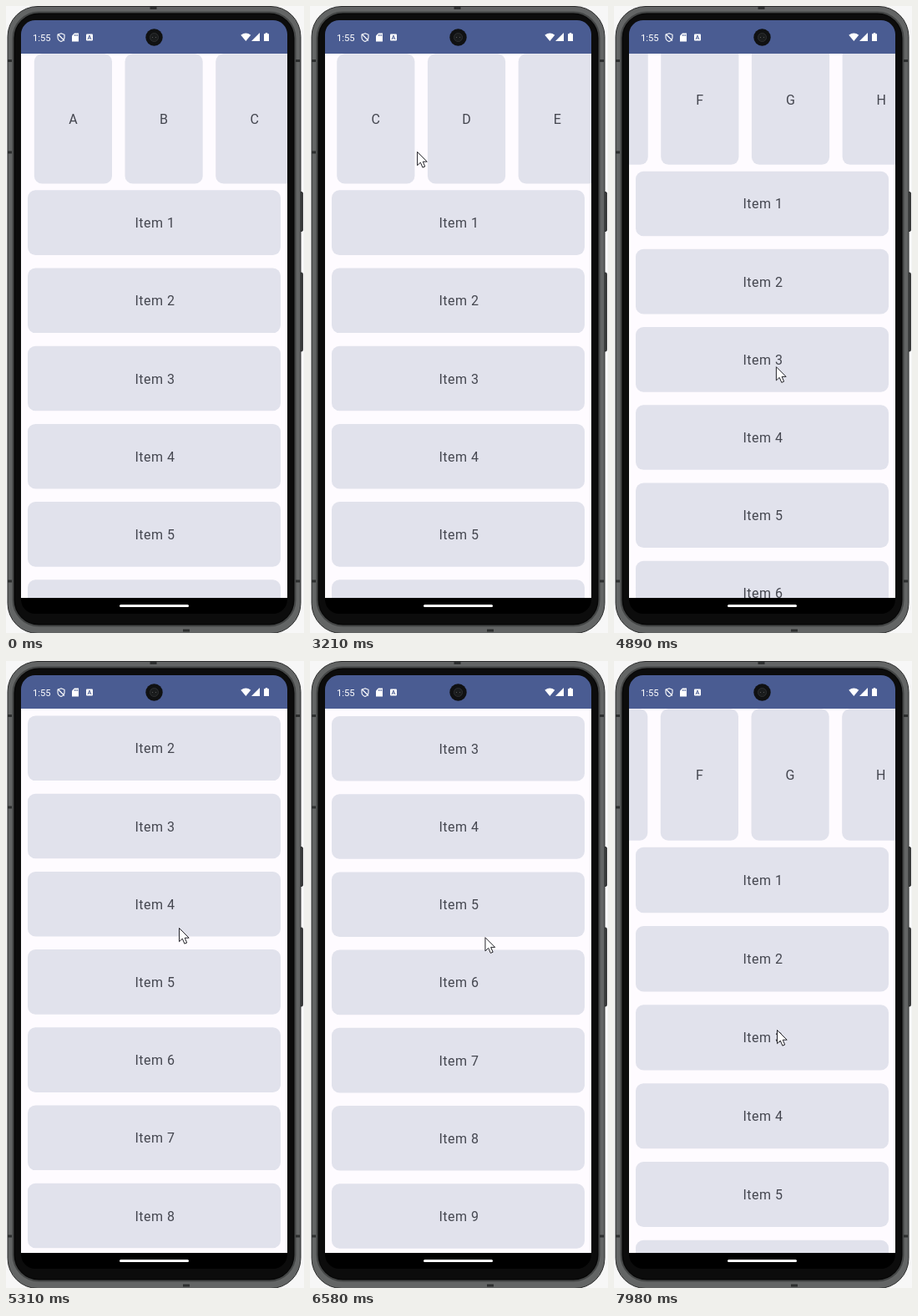
An HTML page for the animation above (8 s loop, 357 px wide and 750 px high).

```html
<!DOCTYPE html>
<html lang="en">
<head>
<meta charset="utf-8">
<title>Nested scrolling list</title>
<style>
html, body { margin: 0; width: 100%; height: 100%; overflow: hidden; background: #f7f7f7; }
svg { display: block; width: 100vw; height: 100vh; }
text { font-family: Roboto, sans-serif; }
#list rect { fill: #e1e2ec; }
#list text { font-size: 16px; letter-spacing: .5px; fill: #44464f; text-anchor: middle; }
</style>
</head>
<body>
<svg viewBox="0 0 357 750">
  <defs>
    <clipPath id="view"><rect x="18" y="57" width="319" height="651"/></clipPath>
    <clipPath id="glass"><rect x="18" y="17" width="319" height="710" rx="17"/></clipPath>
  </defs>

  <!-- phone body -->
  <g fill="#3c3e3e" stroke="#1c1d1d" stroke-width=".8">
    <rect x="350" y="222.5" width="5.5" height="47" rx="1.5"/>
    <rect x="350" y="319" width="5.5" height="94" rx="1.5"/>
  </g>
  <rect x="2" y=".5" width="351" height="750" rx="36" fill="#636565" stroke="#2b2c2c"/>
  <rect x="8.500" y="7.500" width="338" height="734" rx="31" fill="#060606" stroke="#444646" stroke-width="2"/>
  <rect x="11" y="10" width="333" height="729" rx="27" fill="#0c0c0c"/>
  <path d="M2 65.5h5M2 175h5M2 688h5M347 65.5h5M347 688h5M172.5 2.500h8M212 747h8" stroke="#2d2f2f" stroke-width="3"/>

  <!-- screen -->
  <g clip-path="url(#glass)">
    <path d="M18 17h319v710H18z"/>
    <path d="M18 17h319v40H18z" fill="#4a5c92"/>
    <path d="M18 57h319v651H18z" fill="#fefbff"/>
  </g>
  <g id="list" clip-path="url(#view)"></g>
  <rect x="136" y="716" width="83" height="3" rx="1.5" fill="#fff"/>

  <!-- status bar -->
  <circle cx="177.5" cy="37.5" r="10.2" fill="#101112"/>
  <circle cx="177.5" cy="37.5" r="5" fill="#1a1c1d" stroke="#2d2f31"/>
  <path d="M175 37.5h1M179 37.5h1" stroke="#555"/>
  <text x="32" y="41.5" font-size="11.2" fill="#fff">1:55</text>
  <g fill="#fff">
    <path d="M66 32.8l4 1.5v3.2c0 2.5-1.8 4.2-4 5-2.200-.8-4-2.500-4-5v-3.200zM62 33.500l8 8" fill="none" stroke="#fff" stroke-width="1.1"/>
    <path d="M82 32.5h5v10h-8v-7z"/>
    <path d="M82.3 34v2M84 34v2M85.7 34v2" stroke="#4a5c92" stroke-width=".8"/>
    <rect x="96" y="33.5" width="8" height="8" rx="1"/>
    <path d="M98 40l2-5 2 5M98.8 38.3h2.4" fill="none" stroke="#4a5c92" stroke-width=".9"/>
    <path d="M287.3 42l-6-7.300q6-4.400 12 0z"/>
    <path d="M294 42h10V32z"/>
    <path d="M309 33.2h1.8V32h2.4v1.2h1.8V42h-6z"/>
  </g>

  <path id="cursor" d="M0 0V16.2L3.8 12.7 6.4 18.7 9.2 17.5 6.7 11.7H11.7Z" fill="#fff" stroke="#24242a" stroke-linejoin="round"/>
</svg>
<script>
const LOOP = 8000, TOP = 57, VIEW = 651;
const list = document.getElementById('list');
const cursor = document.getElementById('cursor');

const clamp = u => Math.min(1, Math.max(0, u));
const smooth = u => u * u * (3 - 2 * u);
const pullEase = u => u ** 1.6;
const FLING = 250; // decay time of a released list, ms

// A swipe drags with the finger, then glides on towards its rest position
const rowSwipes = [
  { start: 1700, end: 2000, to: 109, rest: 131 },
  { start: 2960, end: 3300, to: 275, rest: 521.5 }
];
const listSwipes = [
  { start: 4780, end: 5100, to: 125, rest: 341.4 },
  { start: 6800, end: 7240, to: 131, rest: -65 }
];

// Cursor stops: time, x, y, and whether it is dragging on its way there
const stops = [
  [1120, 333, 408], [1700, 276, 169], [2000, 167, 169, true], [2960, 215.5, 174], [3300, 72.5, 174, true],
  [4410, 188, 314], [4780, 191, 456], [5100, 207, 319, true], [6360, 207, 319], [6800, 214, 351],
  [7240, 214, 561, true], [7980, 195, 441]
];

const beats = [1120, 1850, 3210, 4890, 5790, 6210, 6360, 7120, 7980, LOOP];

function snap(t) {
  const i = beats.findIndex(b => t < b);
  if (i < 1) return 0;
  const a = beats[i - 1], span = beats[i] - a;
  const step = i === 6 ? span : span / Math.max(1, Math.round(span / 60));
  return a + Math.floor((t - a) / step + 1e-6) * step;
}

function scrolled(swipes, t) {
  let pos = 0;
  for (const { start, end, to, rest } of swipes) {
    if (t < start) break;
    pos = t < end
      ? pos + (to - pos) * pullEase((t - start) / (end - start))
      : rest + (to - rest) * Math.exp((end - t) / FLING);
  }
  return Math.max(0, pos);
}

// Overscroll stretch: a pulse after the list hits its top
function stretched(t) {
  const k = Math.max(0, t - 7500) / 200;
  return 1.7 * k * Math.exp(1 - k);
}

function pointer(t) {
  const i = Math.max(1, stops.findIndex(s => t <= s[0]));
  const [t0, x0, y0] = stops[i - 1], [t1, x1, y1, drag] = stops[i];
  const u = (drag ? pullEase : smooth)(clamp((t - t0) / (t1 - t0)));
  return [x0 + (x1 - x0) * u, y0 + (y1 - y0) * u];
}

function add(tag) {
  return list.appendChild(document.createElementNS('http://www.w3.org/2000/svg', tag));
}

function set(el, attrs) {
  for (const name in attrs) el.setAttribute(name, attrs[name]);
}

function card(label, x, y, w, h, inRow) {
  const box = add('rect'), text = add('text');
  set(box, { width: w, rx: 9.3 });
  text.textContent = label;
  return { box, text, x, y, w, h, inRow };
}

const cards = [
  ...[...'ABCDEFGHI'].map((c, i) => card(c, 33.8 + 108.7 * i, 57.2, 93.2, 155.3, true)),
  ...Array.from({ length: 11 }, (_, i) => card('Item ' + (i + 1), 26, 220.3 + 93.2 * i, 303, 77.6, false))
];

function draw(t) {
  const dx = scrolled(rowSwipes, t), dy = scrolled(listSwipes, t), pull = stretched(t);
  const bend = y => {
    const u = clamp((y - TOP) / VIEW);
    return y + pull * u * (10.5 - 4 * u);
  };
  for (const { box, text, x, y, w, h, inRow } of cards) {
    const left = x - (inRow ? dx : 0), top = bend(y - dy);
    set(box, { x: left, y: top, height: bend(y + h - dy) - top });
    set(text, { x: left + w / 2 + (inRow ? .2 : 1), y: bend(y + h / 2 - dy) + 6 });
  }
  set(cursor, {
    visibility: t < beats[0] ? 'hidden' : 'visible',
    transform: `translate(${pointer(t).map(v => v + .5)})`
  });
}

const start = performance.now();
function tick(now) {
  draw(snap(Math.max(0, now - start) % LOOP));
  requestAnimationFrame(tick);
}
tick(start);
</script>
</body>
</html>
```
